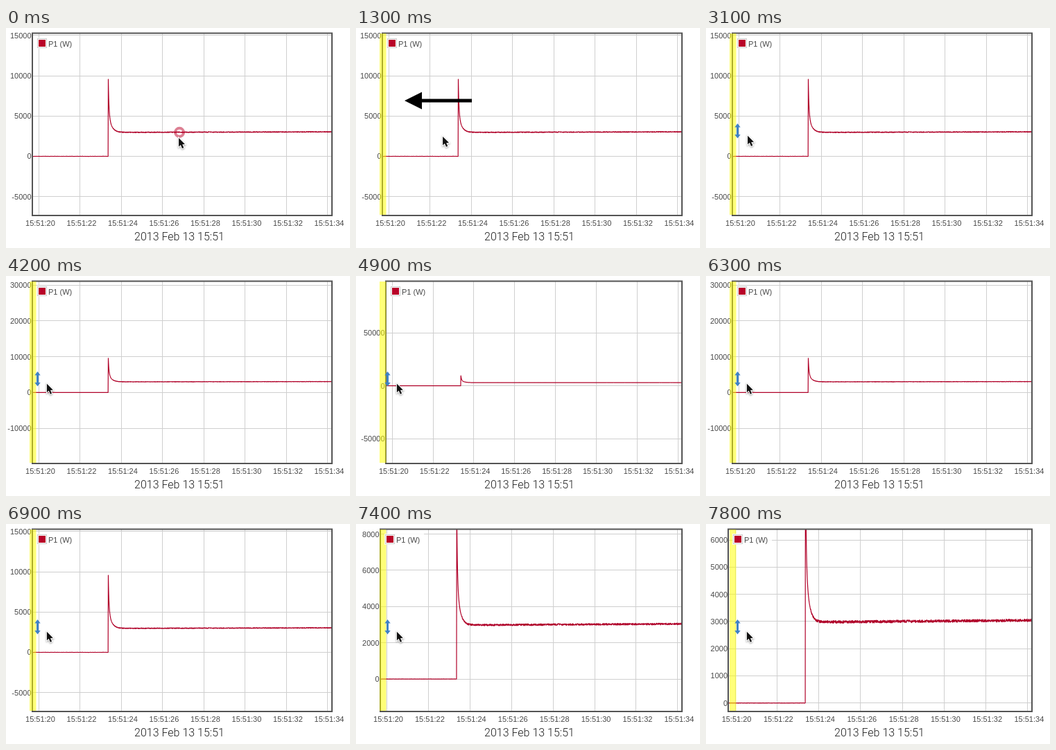
Recreate the animation shown at these times as an HTML page with a canvas. Size 496 by 318 pixels, loop 8 s.

```html
<!DOCTYPE html>
<html lang="en">
<head>
<meta charset="utf-8">
<title>Zooming a power chart</title>
<style>
html, body { margin: 0; width: 496px; height: 318px; overflow: hidden; background: #fff; }
canvas { display: block; }
</style>
</head>
<body>
<canvas id="stage" width="496" height="318"></canvas>
<script>
const ctx = document.getElementById('stage').getContext('2d');
const LOOP = 8000, STEP = 100;
const TOP = 7, RIGHT = 470, BOTTOM = 271;
const T_MIN = 19.7, T_SPAN = 14.52, T_JUMP = 23.38, DT = .01;
const RED = '#b90228', LINE = '#b00229', GRID = '#cfcfcf';
const SANS = '"Liberation Sans", Arial, sans-serif';

const clamp = (v, lo, hi) => Math.min(hi, Math.max(lo, v));
const progress = (t, from, to) => clamp((t - from) / (to - from), 0, 1);
function ease(t, from, to) {
  const p = progress(t, from, to);
  return p * p * (3 - 2 * p);
}

// Six wheel notches out, then nine in, each at its own steady pace.
function zoomAt(t) {
  const out = clamp(Math.floor((t - 3660) / 240), 0, 6);
  const back = clamp(Math.floor((t - 5165) / 275), 0, 9);
  return back - out;
}

function pointerAt(t) {
  const x = 248.3 - 124 * ease(t, 700, 1300) - 59 * ease(t, 2200, 2700)
    - 6 * ease(t, 2800, 3100) - 1.2 * ease(t, 3400, 3500);
  return [x, 157.5 - (248.3 - x) / 60];
}

function noise(i) {
  const v = Math.sin(i * 127.1 + 3.7) * 43758.5453;
  return (v - Math.floor(v)) * 2 - 1;
}

function power(t, i) {
  const d = t - T_JUMP;
  if (d < 0) return noise(i) * 5;
  return 2975 + 6.2 * d + 4000 * Math.exp(-d / .03) + 2600 * Math.exp(-d / .14)
    + (d > .2 ? noise(i) * 50 : 0);
}

// Each zoom level scales the y axis by 1.5; longer labels push the left edge in.
function axes(zoom) {
  const scale = .01164 * 1.5 ** zoom;
  const zero = 154.65 + 2650 * scale;
  const left = zoom < -4 ? 43 : zoom < 1 ? 38 : zoom < 3 ? 35 : 32.5;
  return {
    scale, left, zero,
    x: t => left + (t - T_MIN) * (RIGHT - left) / T_SPAN,
    y: v => zero - v * scale
  };
}

function tickSize(scale) {
  const raw = (BOTTOM - TOP) / scale / 4.87;
  const unit = 10 ** Math.floor(Math.log10(raw)), n = raw / unit;
  return unit * (n < 1.5 ? 1 : n < 3 ? 2 : n < 7.5 ? 5 : 10);
}

function box(x, y, w, h, color) {
  ctx.fillStyle = color;
  ctx.fillRect(x, y, w, h);
}

function text(str, x, y, align, font = '11px ' + SANS, color = '#484848') {
  ctx.font = font;
  ctx.textAlign = align;
  ctx.fillStyle = color;
  ctx.fillText(str, x, y);
}

function shape(points) {
  ctx.beginPath();
  points.forEach(([x, y]) => ctx.lineTo(x, y));
  ctx.closePath();
}

function drawGrid(ax) {
  for (let s = 20; s <= 34; s += 2) {
    box(Math.round(ax.x(s)), TOP, 1, BOTTOM - TOP, GRID);
    text('15:51:' + s, ax.x(s) + 2.5, 286, 'center');
  }
  const size = tickSize(ax.scale);
  const first = Math.ceil((ax.zero - BOTTOM) / ax.scale / size);
  const last = Math.floor((ax.zero - TOP) / ax.scale / size);
  for (let n = first; n <= last; n++) {
    const y = ax.y(n * size);
    box(ax.left, Math.floor(y), RIGHT - ax.left, 1, GRID);
    text(String(n * size), ax.left - 1.5, Math.round(y + 4), 'right');
  }
  text('2013 Feb 13 15:51', 250, 307, 'center', '300 16px Roboto, ' + SANS, '#222');
}

function drawCurve(ax) {
  ctx.save();
  ctx.beginPath();
  ctx.rect(ax.left, TOP, RIGHT - ax.left, BOTTOM - TOP);
  ctx.clip();
  ctx.beginPath();
  for (let i = 0; i * DT <= T_SPAN + DT; i++) {
    const t = T_MIN + i * DT;
    ctx.lineTo(ax.x(t), ax.y(power(t, i)));
  }
  ctx.strokeStyle = LINE;
  ctx.lineWidth = 1.2;
  ctx.lineJoin = 'round';
  ctx.stroke();
  ctx.restore();
}

function drawFrame(ax) {
  ctx.strokeStyle = '#545454';
  ctx.lineWidth = 2;
  ctx.strokeRect(Math.round(ax.left - .5), TOP + .5, RIGHT - Math.round(ax.left - .5), BOTTOM - TOP - .5);
}

function drawLegend(ax) {
  const x = Math.floor(ax.left) + 7;
  box(x - 1, 14, 57, 16, 'rgba(255,255,255,.85)');
  box(x, 15, 14, 14, '#ccc');
  box(x + 1, 16, 12, 12, '#fff');
  box(x + 2, 17, 10, 10, RED);
  text('P1 (W)', x + 16, 27, 'left');
}

// Marks the point of the settled curve nearest to the pointer.
function drawRing(ax, x) {
  if (x < ax.x(T_JUMP + .5)) return;
  ctx.beginPath();
  ctx.arc(x, ax.y(2980), 6, 0, Math.PI * 2);
  ctx.strokeStyle = 'rgba(187,2,40,.5)';
  ctx.lineWidth = 4;
  ctx.stroke();
}

// An arrow whose tip is at the current position, pointing left.
function arrow(length, head, half, shaft) {
  shape([[0, 0], [head, -half], [head, -shaft], [length, -shaft],
    [length, shaft], [head, shaft], [head, half]]);
  ctx.fill();
}

function placeArrow(x, y, turn, ...size) {
  ctx.save();
  ctx.translate(x, y);
  ctx.rotate(turn);
  arrow(...size);
  ctx.restore();
}

function drawBand(t) {
  ctx.globalAlpha = progress(t, 700, 1300);
  box(34, 8, 9.5, 262, 'rgba(255,255,0,.53)');
  ctx.globalAlpha = 1;
}

function drawArrows(t) {
  ctx.globalAlpha = progress(t, 700, 1300) * (1 - progress(t, 2200, 2700));
  ctx.fillStyle = '#000';
  placeArrow(70, 105, 0, 97, 25, 12.5, 2.5);
  ctx.globalAlpha = progress(t, 2800, 3100);
  ctx.fillStyle = '#3f82c6';
  placeArrow(45.5, 138, Math.PI / 2, 11, 5.5, 4.2, 1.5);
  placeArrow(45.5, 159.5, -Math.PI / 2, 11, 5.5, 4.2, 1.5);
  ctx.globalAlpha = 1;
}

function drawPointer(x, y) {
  ctx.save();
  ctx.translate(x, y);
  shape([[.8, 1.5], [.8, 14], [3.6, 11.5], [5.7, 16.4], [8, 15.4], [5.9, 10.7], [9.7, 10.4]]);
  ctx.shadowColor = 'rgba(0,0,0,.4)';
  ctx.shadowBlur = 2.5;
  ctx.shadowOffsetY = 1;
  ctx.strokeStyle = '#fff';
  ctx.lineWidth = 2;
  ctx.stroke();
  ctx.shadowColor = 'transparent';
  ctx.fillStyle = '#111';
  ctx.fill();
  ctx.restore();
}

function draw(now) {
  const t = Math.floor(now % LOOP / STEP) * STEP;
  const ax = axes(zoomAt(t));
  const [px, py] = pointerAt(t);
  box(0, 0, 496, 318, '#fff');
  drawGrid(ax);
  drawCurve(ax);
  drawFrame(ax);
  drawBand(t);
  drawLegend(ax);
  drawRing(ax, px + 1.8);
  drawArrows(t);
  drawPointer(px, py);
}

const start = performance.now();
function tick() {
  draw(performance.now() - start);
  requestAnimationFrame(tick);
}
tick();
</script>
</body>
</html>
```
